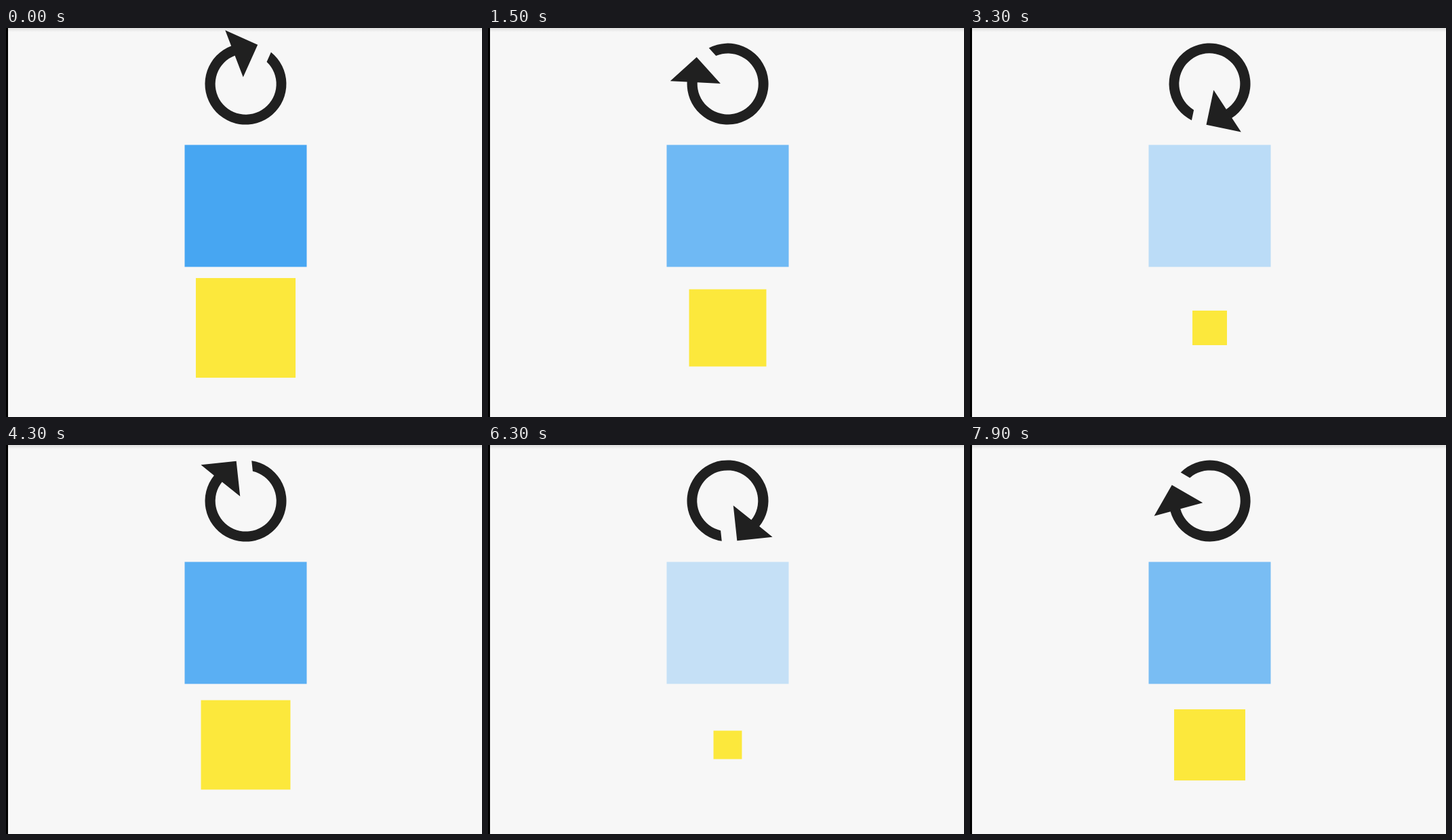
These frames come from a looping animation (702 px wide and 574 px high, 8000 ms). An HTML page:

```html
<!DOCTYPE html>
<html lang="en">
<head>
<meta charset="utf-8">
<title>Rotate, fade, scale</title>
<style>
  html, body { margin: 0; width: 100%; height: 100%; overflow: hidden; background: #f7f7f7; }
  svg { display: block; width: 702px; height: 574px; }
</style>
</head>
<body>
<svg viewBox="0 0 702 574">
  <defs>
    <linearGradient id="shade" x2="0" y2="1">
      <stop stop-color="#dcdcdc"/>
      <stop offset="1" stop-color="#f7f7f7"/>
    </linearGradient>
  </defs>
  <rect width="702" height="574" fill="#f7f7f7"/>
  <rect width="702" height="6" fill="url(#shade)"/>
  <rect width="3" height="574"/>
  <path id="arrow" fill="#202020"
    d="M5.65-5.65A8 8 0 1 0 7.73 2H5.65A6 6 0 1 1 4.22-4.22L1-1H8V-8Z"/>
  <rect id="fader" x="263.5" y="172.5" width="180" height="180" fill="#2195f2"/>
  <rect id="scaler" x="-90" y="-90" width="180" height="180" fill="#fce83c"/>
</svg>
<script>
  const LOOP = 8000, STEP = 200;
  const [arrow, fader, scaler] = ['arrow', 'fader', 'scaler'].map(id => document.getElementById(id));

  // Progress swings between 0 and 1: [ms, value], linear in between
  const keys = [
    [300, .817], [700, .95], [900, .95], [1500, .633], [2100, .342], [2760, 0],
    [3300, .283], [4300, .733], [4700, .95], [4900, .95], [5500, .65],
    [6300, .233], [6750, 0], [7900, .583]
  ];

  function progress(t) {
    const i = Math.max(1, keys.findIndex(k => k[0] >= t));
    const [t0, v0] = keys[i - 1], [t1, v1] = keys[i];
    return v0 + (v1 - v0) * (t - t0) / (t1 - t0);
  }

  function draw(now) {
    const t = now % LOOP;
    // The picture updates five times a second, after an initial hold
    const tick = Math.max(300, Math.floor((t - 100) / STEP) * STEP + 100);
    const p = progress(tick);
    arrow.setAttribute('transform', `translate(353.5 82.5) rotate(${360 * p}) scale(7.5)`);
    fader.setAttribute('opacity', p);
    scaler.setAttribute('transform', `translate(353.5 442.5) scale(${p})`);
    requestAnimationFrame(draw);
  }
  draw(performance.now());
</script>
</body>
</html>
```
